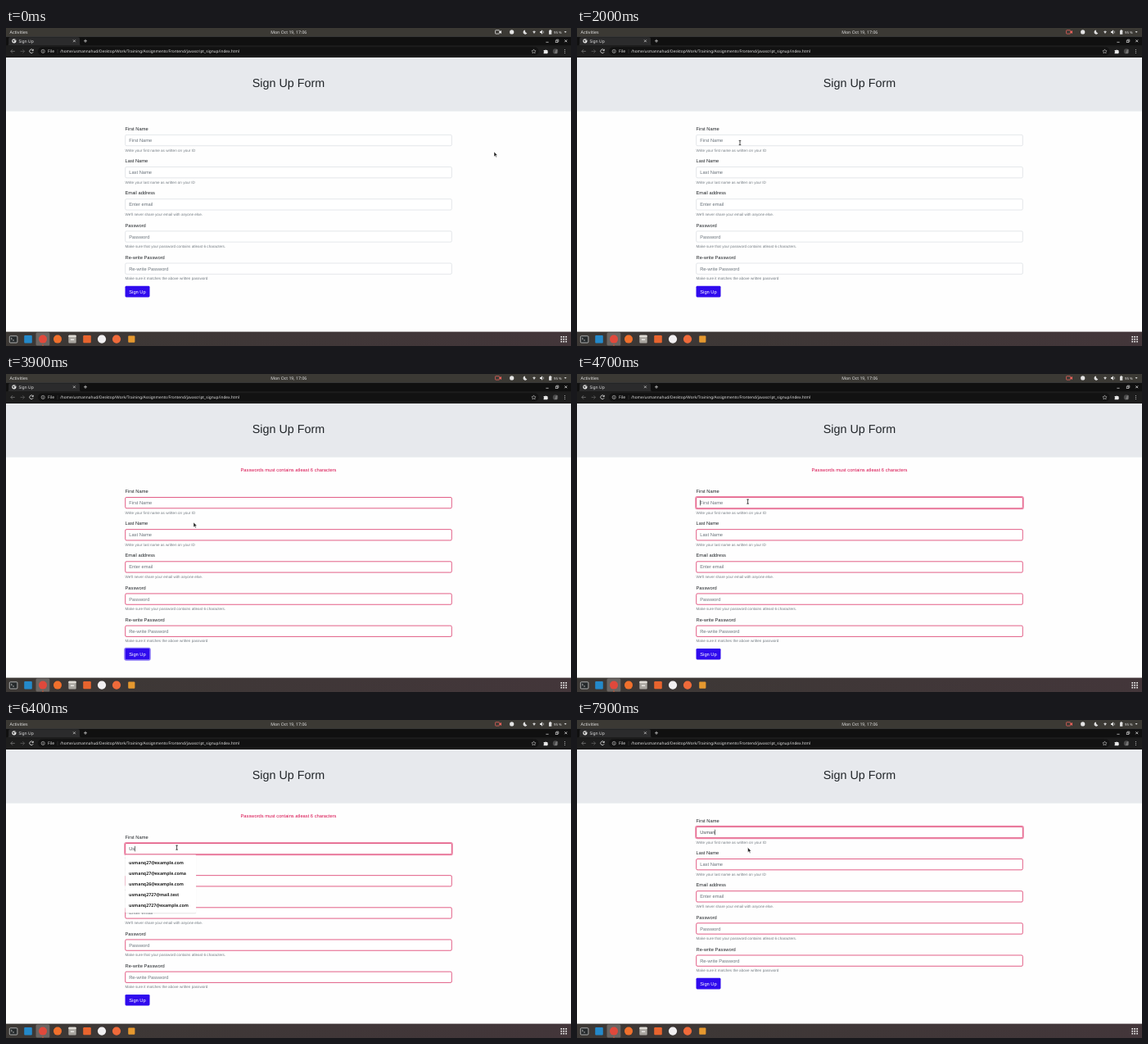
Animation, 690 px wide and 388 px high, one loop 8 s. Source, as an HTML page:

```html
<!DOCTYPE html>
<html lang="en">
<head>
<meta charset="utf-8">
<title>Sign Up</title>
<style>
  html, body { margin: 0; width: 100%; height: 100%; overflow: hidden; background: #fefefe; }
  svg { display: block; width: 100vw; height: 100vh; text-rendering: geometricPrecision; }
  text { white-space: pre; }
  .page { font-family: "Liberation Sans", Arial, sans-serif; font-size: 5.75px; fill: #212529; }
  .ui { font-family: "Noto Sans", sans-serif; font-size: 5px; fill: #e4e4e4; }
  .muted { fill: #6c757d; }
  .help { font-size: 4.6px; fill: #747c83; }
</style>
</head>
<body>
<svg id="stage" viewBox="0 0 690 388"></svg>
<script>
const LOOP = 8000, STEP = 100;
const LEFT = 145.5, WIDTH = 399, ROW = 39.15, FIELD_Y = 130.2, FIELD_H = 13.7, ERROR_SHIFT = 20.1;
const BUTTON = { x: 145.5, y: 314.8, w: 30, h: 13.6 };
const RED = '#d8285e';

const attrs = o => Object.entries(o).map(([k, v]) => `${k}="${v}"`).join(' ');
const rect = (x, y, width, height, fill, more = {}) =>
  `<rect ${attrs({ x, y, width, height, fill, ...more })}/>`;
const circle = (cx, cy, r, fill, more = {}) => `<circle ${attrs({ cx, cy, r, fill, ...more })}/>`;
const text = (x, y, str, more = {}) => `<text ${attrs({ x, y, ...more })}>${str}</text>`;
const line = (d, stroke = '#e0e0e0', width = .7, more = {}) =>
  `<path ${attrs({ d, stroke, 'stroke-width': width, fill: 'none', ...more })}/>`;
const shape = (d, fill, more = {}) => `<path ${attrs({ d, fill, ...more })}/>`;

const fields = [
  ['First Name', 'First Name', 'Write your first name as written on your ID'],
  ['Last Name', 'Last Name', 'Write your last name as written on your ID'],
  ['Email address', 'Enter email', "We'll never share your email with anyone else."],
  ['Password', 'Password', 'Make sure that your password contains atleast 6 characters.'],
  ['Re-write Password', 'Re-write Password', 'Make sure it matches the above written password']
];

const topBar = () => rect(0, 0, 690, 10.2, '#3b3934') +
  text(4.5, 6.8, 'Activities', { 'font-size': 5.3, 'font-weight': 500 }) +
  text(345.3, 6.8, 'Mon Oct 19, 17:06', { 'font-size': 5.2, 'font-weight': 500, 'text-anchor': 'middle' }) +
  `<g id="camera">${rect(597.6, 2.7, 5, 4.4, 'none', { stroke: 'currentColor', 'stroke-width': .8, rx: .6 })}
    ${shape('M602.8 4.3L605 3V7L602.8 5.6Z', 'currentColor')}</g>` +
  circle(617.7, 4.9, 2.6, '#e4e4e4') +
  shape('M634 2.4A2.6 2.6 0 1 0 636.4 6.2A2.9 2.9 0 0 1 634 2.4Z', '#e0e0e0') +
  shape('M643.2 4.2Q645 2.6 646.8 4.2L645 7Z', '#d0d0d0') +
  shape('M652 4H653.2L655 2.3V7.7L653.2 6H652Z', '#e0e0e0') +
  line('M656 3.4Q657.2 5 656 6.6', '#e0e0e0', .6) +
  rect(663, 2.8, 3.3, 5, '#dcdcdc', { rx: .4 }) + rect(664, 2.1, 1.3, .8, '#dcdcdc') +
  text(669, 6.6, '95 %', { 'font-size': 4.3 }) +
  shape('M681.6 4L684.6 4L683.1 6Z', '#d0d0d0');

const browser = () => rect(0, 10.2, 690, 25.8, '#101010') +
  shape('M1 21.5Q3.2 21.5 3.2 19V13.2Q3.2 11.2 5.2 11.2H88Q90 11.2 90 13.2V19Q90 21.5 92 21.5Z', '#2b2b2c') +
  rect(0, 21.2, 690, 14.8, '#1d1d1d') +
  rect(39, 23.2, 611.5, 10.2, '#121212', { rx: 5.1 }) +
  circle(9.9, 15.8, 2.6, '#e8e8e8') + shape('M8 15L9.6 14.6L10.4 16L9.4 17.6ZM10.4 13.4L12 14.6L11 15.4Z', '#3a3a3a') +
  text(15.5, 17.6, 'Sign Up') +
  line('M82 14.4L84.8 17.2M84.8 14.4L82 17.2') +
  line('M95 15.8H99M97 13.8V17.8') +
  line('M659.4 17.3H662.6') +
  rect(671.2, 15.1, 2.6, 2.6, 'none', { stroke: '#e0e0e0', 'stroke-width': .6 }) +
  line('M672.2 15V14.1H674.8V16.7H673.9', '#e0e0e0', .6) +
  line('M682.3 14.4L685.1 17.2M685.1 14.4L682.3 17.2', '#eee', .8) +
  line('M10.8 28.4H5.9M8 26.2L5.8 28.4L8 30.6', '#858585') +
  line('M17.6 28.4H22.5M20.4 26.2L22.6 28.4L20.4 30.6', '#666') +
  line('M33 27A2.3 2.3 0 1 0 33.2 29.2M33.3 25.8V27.6H31.5', '#e8e8e8', .8) +
  circle(45.2, 28.4, 2.1, 'none', { stroke: '#d0d0d0', 'stroke-width': .6 }) +
  line('M45.2 28V29.7M45.2 27V27.5', '#d0d0d0', .6) +
  text(51, 30.2, 'File') + line('M63 26V31', '#555', .4) +
  text(66, 30.2, '/home/usmannahud/Desktop/Work/Training/Assignments/Frontend/javascript_signup/index.html',
    { 'font-size': 4.77 }) +
  line('M644.5 25.9L645.3 27.6L647.1 27.8L645.8 29L646.1 30.8L644.5 29.9L642.9 30.8L643.2 29L641.9 27.8L643.7 27.6Z', '#d8d8d8', .5) +
  shape('M656.6 27H658.2A1 1 0 0 1 660 27H661.4V28.4A1 1 0 0 1 661.4 30.2V31.2H656.6V29.8A.9 .9 0 0 0 656.6 28.3Z', '#e8e8e8') +
  circle(671, 28.4, 3.2, '#4a4a4a') + shape('M669.8 31L671.6 26.5L673.4 26L673 31Z', '#777') +
  [26.4, 28.4, 30.4].map(y => circle(682.4, y, .5, '#e0e0e0')).join('');

const dock = () => rect(0, 370.6, 690, 17.4, 'url(#dockFill)') +
  rect(36.5, 371.5, 16.8, 16, '#6a6562', { rx: 1.5 }) +
  rect(4.3, 375.8, 9.6, 8.2, '#262a2c', { rx: 1, stroke: '#c9cccc', 'stroke-width': .8 }) +
  line('M6 378L7.4 379.2L6 380.4M8 381H10', '#f0f0f0', .6) +
  rect(22.2, 375, 9.6, 9.6, '#2489ca', { rx: 1 }) +
  circle(45, 379.6, 5, '#e0493c') +
  circle(63, 379.6, 5, '#f0702c') +
  rect(76.3, 374.8, 9.4, 9.6, '#aaa6a0', { rx: 1 }) + rect(76.3, 374.8, 9.4, 2.4, '#dedad4', { rx: 1 }) +
  rect(78.8, 379.4, 4.4, 1.6, '#e8e6e2', { rx: .4 }) +
  rect(94.2, 375, 9.6, 9.2, '#e8642e', { rx: 1.2 }) +
  circle(117, 379.6, 5.1, '#f1eff1') +
  circle(135, 379.6, 5.1, '#ef6a3a') +
  rect(149.2, 375.4, 8.2, 8.4, '#e5982f', { rx: 1 }) +
  circle(45, 387, .8, '#e2562a') +
  Array.from({ length: 9 }, (_, i) =>
    rect(677.4 + i % 3 * 2.9, 376 + Math.floor(i / 3) * 2.9, 1.7, 1.7, '#eee')).join('');

const formRow = ([label, hint, help], i) => `<g transform="translate(0 ${i * ROW})">` +
  text(LEFT, 125.1, label) +
  (i ? '' : rect(LEFT - .7, FIELD_Y - .7, WIDTH + 1.4, FIELD_H + 1.4, 'none',
    { id: 'glow', rx: 2, stroke: '#ef8fae', 'stroke-width': 1.3 })) +
  rect(LEFT + .2, FIELD_Y + .2, WIDTH - .4, FIELD_H - .4, '#fff', { class: 'field', rx: 1.4 }) +
  text(150.2, 139.1, hint, { class: 'muted', ...(i ? {} : { id: 'firstName' }) }) +
  text(LEFT, 150.6, help, { class: 'help' }) + '</g>';

const stage = document.getElementById('stage');
stage.innerHTML = `
  <defs>
    <linearGradient id="dockFill"><stop stop-color="#3c3835"/><stop offset="1" stop-color="#43363a"/></linearGradient>
    <filter id="soft" x="-10%" y="-10%" width="120%" height="120%">
      <feDropShadow dx="0" dy=".5" stdDeviation=".7" flood-opacity=".3"/></filter>
  </defs>
  <g class="page">
    ${rect(0, 36, 690, 335, '#fefefe')}
    ${rect(0, 36, 690, 65.6, '#e7e9ed')}
    ${text(345, 72.3, 'Sign Up Form', { 'font-size': 14.35, 'text-anchor': 'middle' })}
    ${text(345, 119.2, 'Passwords must contains atleast 6 characters',
      { id: 'error', 'text-anchor': 'middle', fill: '#d80b4c' })}
    <g id="form">
      ${fields.map(formRow).join('')}
      ${rect(BUTTON.x - .6, BUTTON.y - .6, BUTTON.w + 1.2, BUTTON.h + 1.2, 'none',
        { id: 'buttonRing', rx: 2, stroke: '#8673f6', 'stroke-width': 1.3 })}
      ${rect(BUTTON.x, BUTTON.y, BUTTON.w, BUTTON.h, '#300bee', { id: 'button', rx: 1.4 })}
      ${text(160.5, 323.5, 'Sign Up', { fill: '#fff', 'text-anchor': 'middle' })}
      ${rect(150, 133.7, .7, 6.6, '#333', { id: 'caret' })}
    </g>
  </g>
  <g class="ui">${topBar()}${browser()}${dock()}</g>
  <g id="popup" class="ui"></g>
  <g id="cursor">
    ${shape('M0 0V5.9L1.4 4.7L2.4 6.8L3.3 6.4L2.4 4.3H4.2Z', '#222',
      { id: 'arrow', stroke: '#fff', 'stroke-width': .45 })}
    ${line('M-1.3 -2.6H1.3M0 -2.6V2.6M-1.3 2.6H1.3', '#222', .8, { id: 'beam' })}
    ${shape('M0 0Q.8 -.4 1 .4V2.2L3.6 2.8Q4.2 3 4 4L3.4 6H.6L-1.2 3.4Q-1 2.6 0 3.2Z', '#222',
      { id: 'hand', stroke: '#fff', 'stroke-width': .5 })}
  </g>`;

const $ = id => document.getElementById(id);
const show = (id, on) => $(id).setAttribute('visibility', on ? 'visible' : 'hidden');
const set = (id, values) => { for (const k in values) $(id).setAttribute(k, values[k]); };

// time, x, y of the pointer's hot spot
const path = [
  [1200, 596, 151], [2000, 199, 140], [2800, 199, 140], [3300, 156, 319], [3600, 156, 319],
  [3700, 193, 284], [3800, 212, 232], [3900, 229, 181], [4000, 245, 169], [4100, 253, 164],
  [4200, 238, 159], [4300, 218, 156], [4400, 208.6, 155.6]
];
function pointerAt(t) {
  const i = path.findIndex(p => p[0] > t);
  if (i === 0) return path[0].slice(1);
  if (i < 0) return path[path.length - 1].slice(1);
  const [a, b] = [path[i - 1], path[i]];
  let k = (t - a[0]) / (b[0] - a[0]);
  k = k * k * (3 - 2 * k);
  return [a[1] + (b[1] - a[1]) * k, a[2] + (b[2] - a[2]) * k];
}

const typing = [[5600, 'U'], [6000, 'Us'], [6500, 'Usm'], [6700, 'Usma'], [6800, 'Usman']];
const mail = 'usmanq27@example.com', mail2 = 'usmanq26@example.com', longMail = 'usmanq2727@mail.test';
const lists = [
  { from: 4800, width: 81.7, items: [mail, 'asdasd', '05550100123', 'gordon@mail.test', 'asd', mail + 'a'] },
  { from: 5600, width: 81.7, items: [mail, 'usdusd', 'usd', mail + 'a', mail2, longMail] },
  { from: 6000, width: 86.6, items: [mail, mail + 'a', mail2, longMail, 'usmanq2727@example.com'] },
  { from: 6500, items: [] }
];
const latest = (list, t, key) => list.filter(e => key(e) <= t).pop();

let shownList = null;
function drawPopup(list) {
  if (list === shownList) return;
  shownList = list;
  const items = list ? list.items : [];
  $('popup').innerHTML = items.length ? rect(LEFT, 164.6, list.width, items.length * 12.95 + 5.8, '#fff',
    { rx: .8, filter: 'url(#soft)' }) + items.map((s, i) =>
    text(150, 175.9 + i * 12.95, s, { 'font-size': 5.25, 'font-weight': 600, fill: '#222' })).join('') : '';
}

function render(time) {
  const t = Math.floor(time / STEP) * STEP;
  const invalid = t >= 3600, error = invalid && t < 6500, focused = t >= 4700;
  const shift = error ? ERROR_SHIFT : 0;

  set('camera', { color: t < 100 ? '#e8e8e8' : '#e8625c' });
  set('form', { transform: `translate(0 ${shift})` });
  show('error', error);
  show('glow', focused);
  show('buttonRing', invalid && !focused);
  for (const f of document.querySelectorAll('.field')) {
    f.setAttribute('stroke', invalid ? RED : '#c9cfd5');
    f.setAttribute('stroke-width', invalid ? .75 : .5);
  }

  const typed = latest(typing, t, e => e[0]);
  const name = $('firstName');
  name.textContent = typed ? typed[1] : 'First Name';
  name.style.fill = typed ? '#495057' : '';
  const caretStart = typed ? typed[0] : 4700;
  const caretOn = focused && Math.floor((t - caretStart) / 550) % 2 === 0;
  set('caret', { x: 150 + (typed ? name.getComputedTextLength() : 0) });
  show('caret', caretOn);
  drawPopup(latest(lists, t, e => e.from));

  const [x, y] = pointerAt(t);
  const fy = y - shift;
  const overButton = x >= BUTTON.x && x <= BUTTON.x + BUTTON.w && fy >= BUTTON.y && fy <= BUTTON.y + BUTTON.h;
  const row = (fy - FIELD_Y) / ROW;
  const overField = x >= LEFT && x <= LEFT + WIDTH && row >= 0 && row < fields.length && row % 1 < FIELD_H / ROW;
  set('cursor', { transform: `translate(${x} ${y})` });
  show('hand', overButton);
  show('beam', overField);
  show('arrow', !overButton && !overField);
  set('button', { fill: overButton ? '#2a08cc' : '#300bee' });
}

const start = performance.now();
function tick() {
  render((performance.now() - start) % LOOP);
  requestAnimationFrame(tick);
}
tick();
</script>
</body>
</html>
```
